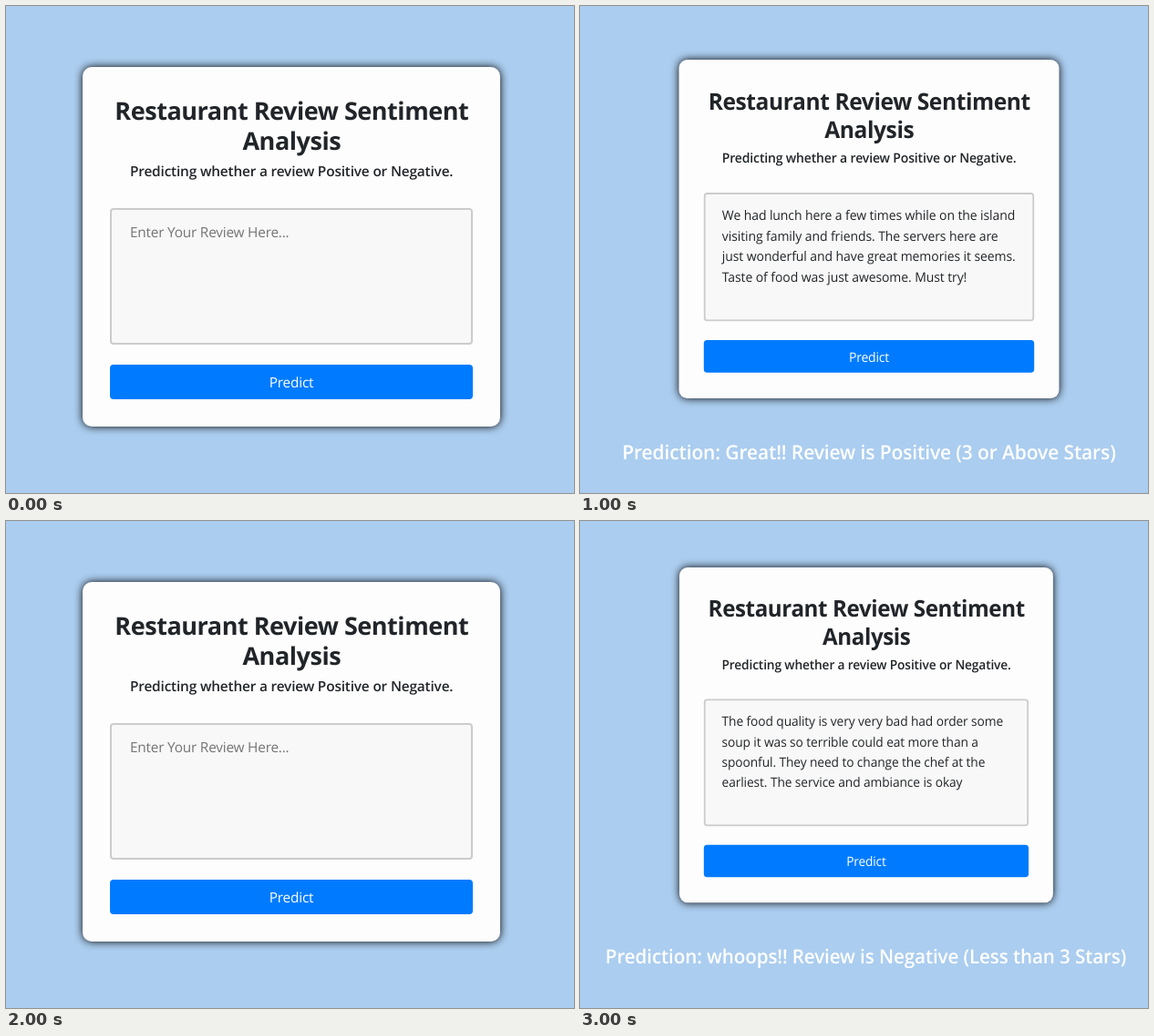
An HTML page that plays this animation: 623x535 px, repeating every 4 s.

```html
<!DOCTYPE html>
<html lang="en">
<head>
<meta charset="utf-8">
<title>Review Sentiment</title>
<style>
  html, body { margin: 0; width: 100%; height: 100%; overflow: hidden; background: #abcdef; }
  svg { display: block; width: 623px; height: 535px; }

  text {
    font: 400 15.36px "Open Sans", "Noto Sans", sans-serif;
    letter-spacing: -.0065em;
    text-rendering: geometricPrecision;
    fill: #212529;
  }
  .mid { text-anchor: middle; }
  .title { font-size: 27px; font-weight: 700; letter-spacing: -.017em; }
  .sub { font-weight: 600; letter-spacing: -.0105em; }
  .result { font-size: 23.04px; font-weight: 600; letter-spacing: -.005em; fill: #fff; }
  .hint, .label { letter-spacing: -.013em; }
  .hint { fill: #757575; }
  .label { fill: #fff; }

  .card { fill: #fdfdfd; filter: drop-shadow(0 0 5px #000); }
  .field { fill: #f8f8f8; stroke: #ccc; stroke-width: 2; }
  .button { fill: #007bff; }

  .empty { animation: empty 4s step-end infinite; }
  .good { animation: good 4s step-end infinite; }
  .bad { animation: bad 4s step-end infinite; }
  @keyframes empty {
    0%, 50% { visibility: visible; }
    25%, 75%, 100% { visibility: hidden; }
  }
  @keyframes good {
    0%, 50%, 100% { visibility: hidden; }
    25% { visibility: visible; }
  }
  @keyframes bad {
    0%, 100% { visibility: hidden; }
    75% { visibility: visible; }
  }
</style>
</head>
<body>
<svg viewBox="0 0 623 535">
  <defs>
    <g id="panel">
      <rect class="card" x="84" y="67" width="458" height="395" rx="10"/>
      <text class="title mid" x="313.3" y="125">Restaurant Review Sentiment</text>
      <text class="title mid" x="313.3" y="158">Analysis</text>
      <text class="sub mid" x="313.2" y="187">Predicting whether a review Positive or Negative.</text>
      <rect class="field" x="115" y="223" width="396" height="148" rx="3"/>
      <rect class="button" x="114" y="394" width="398" height="38" rx="4"/>
      <text class="label mid" x="313" y="419">Predict</text>
    </g>
  </defs>

  <g class="empty">
    <use href="#panel"/>
    <text class="hint" x="136" y="254">Enter Your Review Here...</text>
  </g>

  <g class="good" transform="translate(32 -4.1) scale(.9105 .942)">
    <use href="#panel"/>
    <text>
      <tspan x="136" y="254">We had lunch here a few times while on the island</tspan>
      <tspan x="136" y="278">visiting family and friends. The servers here are</tspan>
      <tspan x="136" y="302">just wonderful and have great memories it seems.</tspan>
      <tspan x="136" y="326">Taste of food was just awesome. Must try!</tspan>
    </text>
    <text class="result mid" x="313" y="533">Prediction: Great!! Review is Positive (3 or Above Stars)</text>
  </g>

  <g class="bad" transform="translate(33.8 -11.4) scale(.895 .932)">
    <use href="#panel"/>
    <text>
      <tspan x="136" y="254">The food quality is very very bad had order some</tspan>
      <tspan x="136" y="278">soup it was so terrible could eat more than a</tspan>
      <tspan x="136" y="302">spoonful. They need to change the chef at the</tspan>
      <tspan x="136" y="326">earliest. The service and ambiance is okay</tspan>
    </text>
    <text class="result mid" x="312.5" y="534">Prediction: whoops!! Review is Negative (Less than 3 Stars)</text>
  </g>
</svg>
</body>
</html>
```
